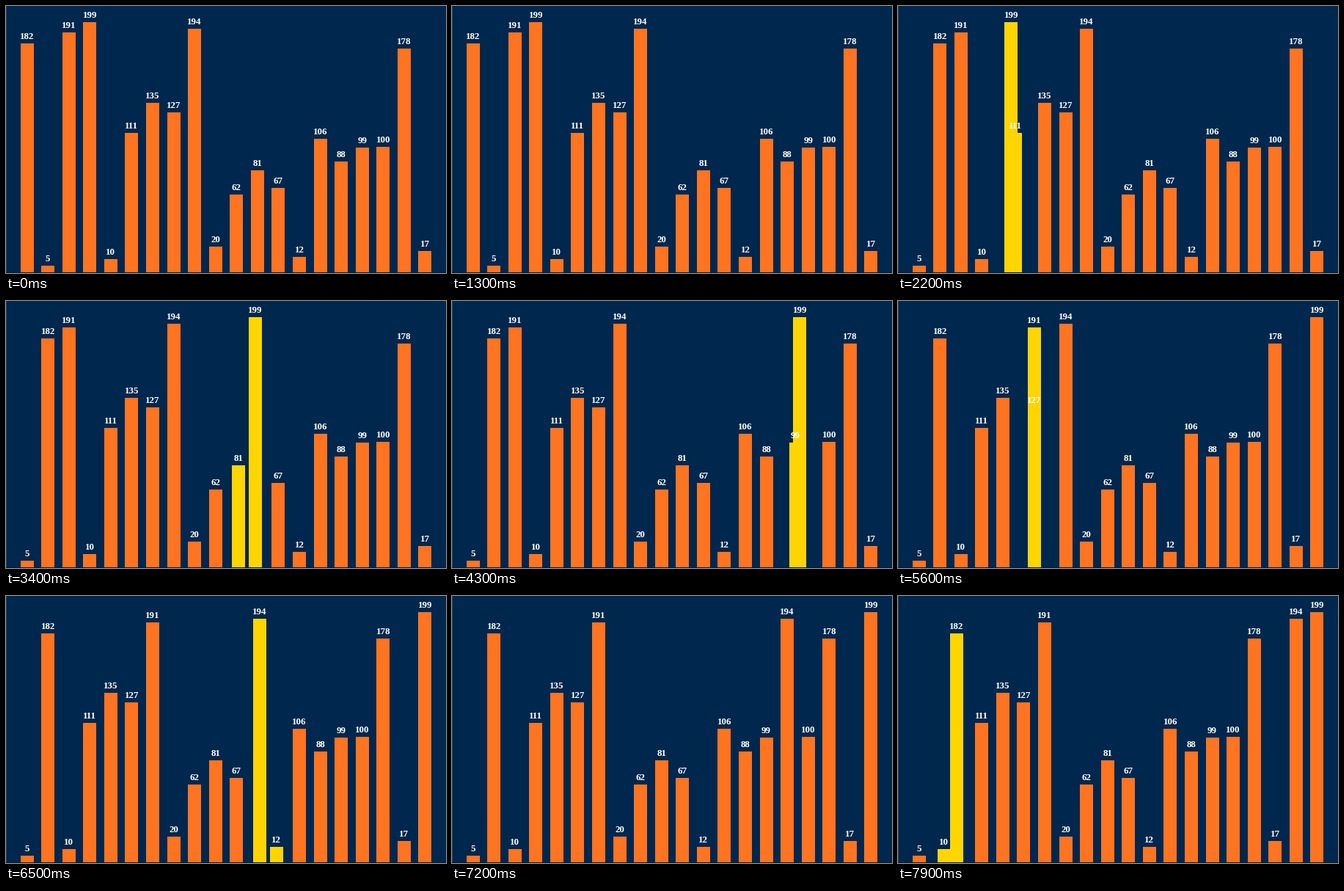
Recreate the animation shown at these times as a matplotlib script. Size 600 px wide and 364 px high, loop 8000 ms.

```python
import matplotlib.pyplot as plt
import numpy as np
from matplotlib.animation import FuncAnimation
from matplotlib.patches import Rectangle

W, H, DPI = 600, 364, 100
FRAMES, INTERVAL = 80, 100
NAVY, ORANGE, YELLOW = "#00274d", "#ff7420", "#ffd500"

VALUES = [182, 5, 191, 199, 10, 111, 135, 127, 194, 20,
          62, 81, 67, 12, 106, 88, 99, 100, 178, 17]
N = len(VALUES)
PITCH = W / (N + 1)
BAR_W = 18
FLOOR = 362.6
SCALE = 1.711
LABEL_GAP = 6
FONT_PX = 13
SWAP_STEPS = 10

# Pace of the sort: time in ms against ticks done; it waits before starting.
PACE_MS = [0, 1730, 2200, 3400, 4300, 5600, 6500, 7900]
PACE_TICKS = [0, 0, 28, 99, 151, 229, 281, 366]


def bubble_ticks():
    """List (slot of each bar, moving bars) for every tick of a bubble sort."""
    order = list(range(N))
    slots = np.arange(N, dtype=float)
    ticks = []
    for last in range(N - 1, 0, -1):
        for i in range(last):
            ticks.append((slots.copy(), ()))
            a, b = order[i], order[i + 1]
            if VALUES[a] <= VALUES[b]:
                continue
            for step in range(1, SWAP_STEPS + 1):
                slots[a] = i + step / SWAP_STEPS
                slots[b] = i + 1 - step / SWAP_STEPS
                ticks.append((slots.copy(), (a, b)))
            order[i], order[i + 1] = b, a
    return ticks


TICKS = bubble_ticks()

fig = plt.figure(figsize=(W / DPI, H / DPI), dpi=DPI, facecolor=NAVY)
ax = fig.add_axes([0, 0, 1, 1])
ax.set_xlim(0, W)
ax.set_ylim(H, 0)
ax.axis("off")

# Faint edges of the canvas
ax.add_patch(Rectangle((0, 0), 1, H, color="#23466a", lw=0))
ax.add_patch(Rectangle((0, H - 1), W, 1, color="#001c3a", lw=0))

bars, labels = [], []
for value in VALUES:
    top = FLOOR - value * SCALE
    bar = Rectangle((0, top), BAR_W, FLOOR - top, lw=0, zorder=2)
    bars.append(ax.add_patch(bar))
    labels.append(ax.text(0, top - LABEL_GAP, str(value), color="white",
                          family="Liberation Serif", weight="bold",
                          size=FONT_PX * 72 / DPI, ha="center",
                          va="baseline", zorder=4))


def draw(frame):
    tick = int(round(np.interp(frame * INTERVAL, PACE_MS, PACE_TICKS)))
    slots, moving = TICKS[tick]
    for k, (bar, label) in enumerate(zip(bars, labels)):
        x = PITCH * (slots[k] + 1)
        bar.set_x(x - BAR_W / 2)
        bar.set_facecolor(YELLOW if k in moving else ORANGE)
        bar.set_zorder(3 if k in moving else 2)
        label.set_x(x)
    return bars + labels


anim = FuncAnimation(fig, draw, frames=FRAMES, interval=INTERVAL,
                     init_func=lambda: draw(0), repeat=True, repeat_delay=0)
plt.show()
```
